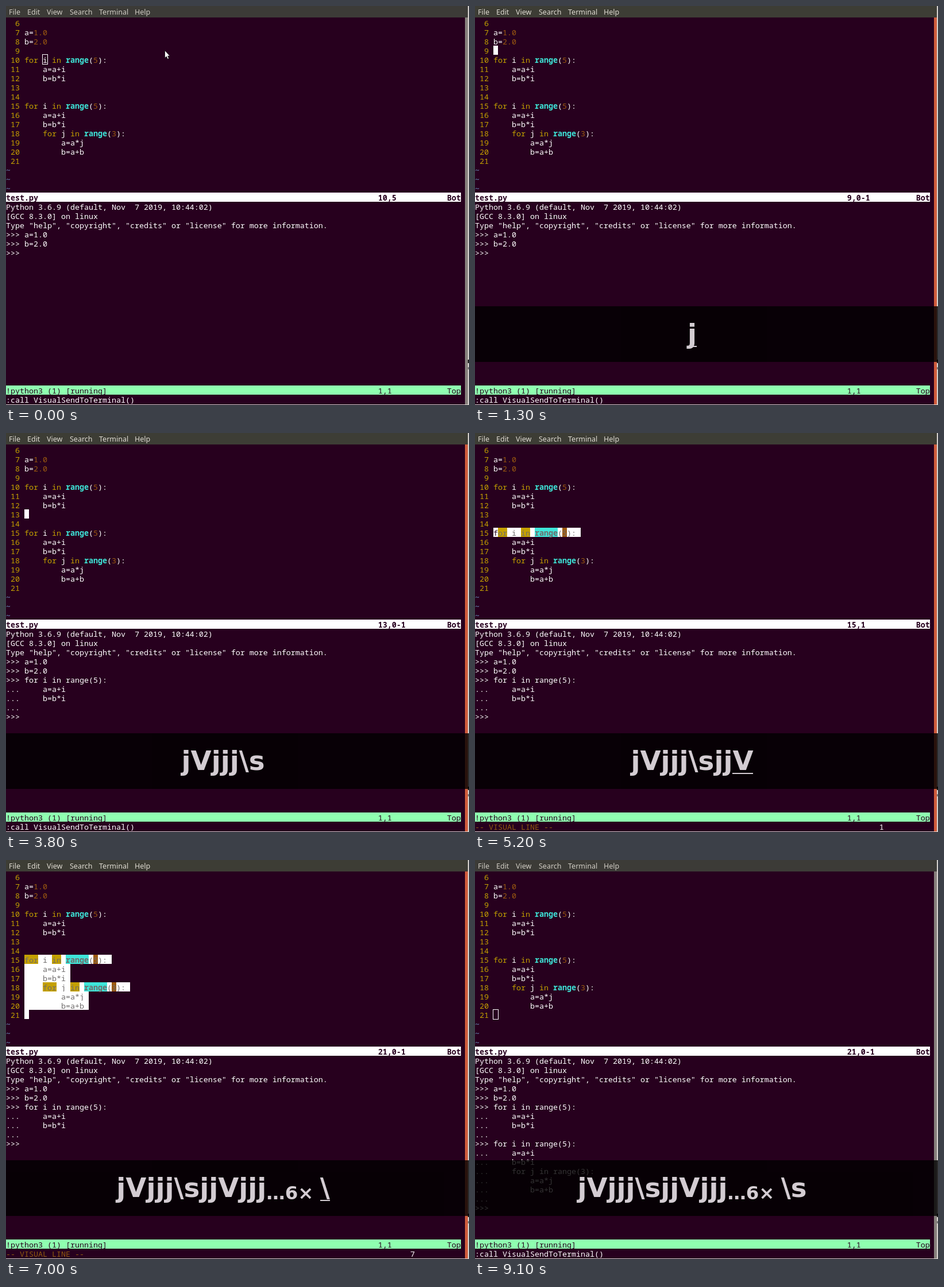
These frames come from a looping animation (806 px wide and 695 px high, 9200 ms). An HTML page:

```html
<!DOCTYPE html>
<html lang="en">
<head>
<meta charset="utf-8">
<title>Sending code from an editor to a terminal</title>
<style>
  html, body { margin: 0; width: 100%; height: 100%; overflow: hidden; }
  body { background: #d3cfcc; }
  #stage {
    --bg: #27001e;
    position: relative; width: 806px; height: 695px; overflow: hidden;
    color: #fff; font: 13.3333px/18px "Noto Sans Mono", monospace;
  }
  #stage div { position: absolute; white-space: pre; }
  #window { left: 0; top: 0; width: 804px; height: 694px; background: var(--bg); }
  #menu {
    left: 0; top: 0; width: 804px; height: 20px; background: #3c3b37; color: #d0ccc4;
    font: 12.5px/21px "Noto Sans", sans-serif;
  }
  .focus #menu { background: #3d3d35; color: #dfdbd2; }
  #menu span { position: absolute; }
  #scroll { left: 799px; top: 20px; width: 5px; height: 674px; background: #86807c; }
  .focus #scroll { background: #d05c3c; }
  .edge { left: 804px; width: 2px; background: #222; }

  .row { left: 0; width: 792px; height: 16px; }
  .row span { display: inline-block; height: 16px; vertical-align: top; }
  .number, .key { color: #c4a000; }
  .const { color: #9c5a10; }
  .call { color: #3ee6d9; font-weight: bold; }
  .tilde { color: #729fcf; }
  .mode { color: #8f5a10; }
  .sel span { background: #fff; color: #6f6c6c; }
  .sel .key { background: #c4a000; }
  .sel .const { background: #9c5a10; }
  .sel .call { background: #3ee6d9; }
  .status { background: #fff; color: var(--bg); font-weight: bold; }
  .running { background: #8fffb0; color: var(--bg); }

  #cursor {
    width: 10px; height: 18px; margin: -1px; box-sizing: border-box; border: 1px solid #fff;
  }
  .focus #cursor {
    width: 8px; height: 16px; margin: 0; border: 0; background: #fff; color: var(--bg);
  }

  #keys {
    left: 0; top: 523px; width: 806px; height: 97px; background: #000; opacity: .8;
    font: bold 46.67px/96px "DejaVu Sans", sans-serif;
  }
  #typed { left: -22px; width: 800px; text-align: center; }
  #typed sub { font-size: 32.4px; line-height: 0; vertical-align: -4px; }
  #typed u { position: relative; display: inline-block; height: 96px; text-decoration: none; }
  #typed u::after {
    content: ""; position: absolute; left: 0; top: 69px; width: 100%; height: 2px; background: #fff;
  }
  #mouse { position: absolute; overflow: visible; }
</style>
</head>
<body>
<div id="stage">
  <div id="window"></div>
  <div id="menu"></div>
  <div id="scroll"></div>
  <div class="edge" style="top:616px;height:6px"></div>
  <div class="edge" style="top:629px;height:4px;background:#777"></div>
  <div id="rows"></div>
  <div id="cursor"></div>
  <div id="keys"><div id="typed"></div></div>
  <svg id="mouse" width="12" height="17">
    <path d="M.5 .5V13.5L3.4 10.9L5.3 15.4L7.5 14.4L5.6 10.1H9.3Z" fill="#fff" stroke="#111" stroke-width=".8"/>
  </svg>
</div>
<script>
const LOOP = 9200, CELL = 8, LINE = 16, TOP = 21, FIRST = 6;
const $ = id => document.getElementById(id);

const source = `
a=1.0
b=2.0

for i in range(5):
    a=a+i
    b=b*i


for i in range(5):
    a=a+i
    b=b*i
    for j in range(3):
        a=a*j
        b=a+b
`.split('\n');

const session = [
  `Python 3.6.9 (default, Nov  7 2019, 10:44:02)
[GCC 8.3.0] on linux
Type "help", "copyright", "credits" or "license" for more information.
>>> a=1.0
>>> b=2.0
>>> `,
  `for i in range(5):
...     a=a+i
...     b=b*i
... 
>>> `,
  `for i in range(5):
...     a=a+i
...     b=b*i
...     for j in range(3):
...         a=a*j
...         b=a+b
... 
>>> `
];

const at = (line, col = 1) => ({ line, col });
const type = keys => ({ keys, mark: true });
const rest = { mark: false };
const A = 'jVjjj\\s', B = A + 'jjV', C = B + 'jjj';

// Each step changes part of the state from its time on.
const steps = [
  [0, { focus: false, ...at(10, 5), sel: 0, pending: '', runs: 0, keys: '', mark: false, mouse: [276, 77] }],
  [300, { focus: true }],
  [400, at(9)],
  [1300, { ...type('j'), mouse: null }],
  [1400, at(10, 18)],
  [1500, rest],
  [1900, type('jV')],
  [2000, { sel: 10 }],
  [2100, rest],
  [2200, type('jVj')],
  [2300, { ...type('jVjj'), ...at(11, 10) }],
  [2400, at(12, 10)],
  [2600, rest],
  [2700, type('jVjjj')],
  [2800, at(13)],
  [2900, rest],
  [3400, type('jVjjj\\')],
  [3500, { pending: '\\' }],
  [3600, type(A)],
  [3700, { sel: 0, pending: '' }],
  [3800, { runs: 1, mark: false }],
  [4600, { ...type(A + 'j'), ...at(14) }],
  [4700, { ...type(A + 'jj'), ...at(15) }],
  [4900, rest],
  [5200, { ...type(B), sel: 15 }],
  [5400, type(B + 'j')],
  [5500, at(16)],
  [5600, { ...type(B + 'jj'), ...at(17) }],
  [5700, type(C)],
  [5800, at(18)],
  [5900, type(C + '…4×')],
  [6000, { ...type(C + '…5×'), ...at(19) }],
  [6100, { ...type(C + '…6×'), ...at(20) }],
  [6200, at(21)],
  [6300, rest],
  [7000, type(C + '…6× \\')],
  [7100, { pending: '\\' }],
  [7300, type(C + '…6× \\s')],
  [7400, { sel: 0, pending: '', runs: 2, mark: false }],
  [8400, { mouse: [276, 77] }],
  [8500, { mouse: [237, 25] }],
  [8700, { mouse: null }],
  [9100, { focus: false }]
];

const escape = s => s.replace(/&/g, '&amp;').replace(/</g, '&lt;').replace(/>/g, '&gt;');
const span = (text, kind = '') => `<span class="${kind}">${escape(text)}</span>`;
const row = (n, html, kind = '') =>
  `<div class="row ${kind}" style="top:${TOP + n * LINE}px">${html}</div>`;

function highlight(code) {
  const kindOf = t => /^(for|in)$/.test(t) ? 'key' : t === 'range' ? 'call' : /^\d/.test(t) ? 'const' : '';
  return code.split(/(\bfor\b|\bin\b|\brange\b|\d+(?:\.\d+)?)/)
    .filter(Boolean).map(t => span(t, kindOf(t))).join('');
}

function codeRow(code, i, s) {
  const line = FIRST + i, picked = s.sel && line >= s.sel && line <= s.line;
  const body = highlight(code) + (picked ? span(' ') : '');
  return row(i, span(String(line).padStart(3) + ' ', 'number') +
    `<span class="${picked ? 'sel' : ''}">${body}</span>`);
}

const statusText = (name, pos, where) => escape(name.padEnd(81) + pos.padEnd(15) + where);

function render(s) {
  const code = source[s.line - FIRST];
  const pos = `${s.line},${code ? s.col : '0-1'}`;
  const output = session.slice(0, s.runs + 1).join('').split('\n');
  const command = s.sel
    ? span('-- VISUAL LINE --'.padEnd(88), 'mode') + span(s.pending || String(s.line - s.sel + 1))
    : ':call VisualSendToTerminal()';

  $('rows').innerHTML =
    source.map((c, i) => codeRow(c, i, s)).join('') +
    [16, 17, 18].map(n => row(n, '~', 'tilde')).join('') +
    row(19, statusText('test.py', pos, 'Bot'), 'status') +
    output.map((text, i) => row(20 + i, escape(text))).join('') +
    row(40, statusText('!python3 (1) [running]', '1,1', 'Top'), 'running') +
    row(41, command);

  $('stage').className = s.focus ? 'focus' : '';
  const cursor = $('cursor');
  cursor.style.left = (s.col + 3) * CELL + 'px';
  cursor.style.top = TOP + (s.line - FIRST) * LINE + 'px';
  cursor.textContent = s.focus ? code[s.col - 1] || '' : '';

  $('keys').style.display = s.keys ? '' : 'none';
  const typed = s.mark ? s.keys.replace(/[^×]$/, '<u>$&</u>') : s.keys;
  $('typed').innerHTML = typed.replace(/…\d× ?/, '<sub>$&</sub>');

  const mouse = $('mouse').style;
  mouse.display = s.mouse ? '' : 'none';
  if (s.mouse) [mouse.left, mouse.top] = s.mouse.map(v => v + 'px');
}

$('menu').innerHTML = Object.entries({ File: 5, Edit: 37, View: 71, Search: 111, Terminal: 162, Help: 224 })
  .map(([name, x]) => `<span style="left:${x}px">${name}</span>`).join('');

let shown = -1;
function tick() {
  const t = performance.now() % LOOP;
  const count = steps.filter(([time]) => time <= t).length;
  if (count !== shown) {
    shown = count;
    render(Object.assign({}, ...steps.slice(0, count).map(step => step[1])));
  }
  requestAnimationFrame(tick);
}
tick();
</script>
</body>
</html>
```
